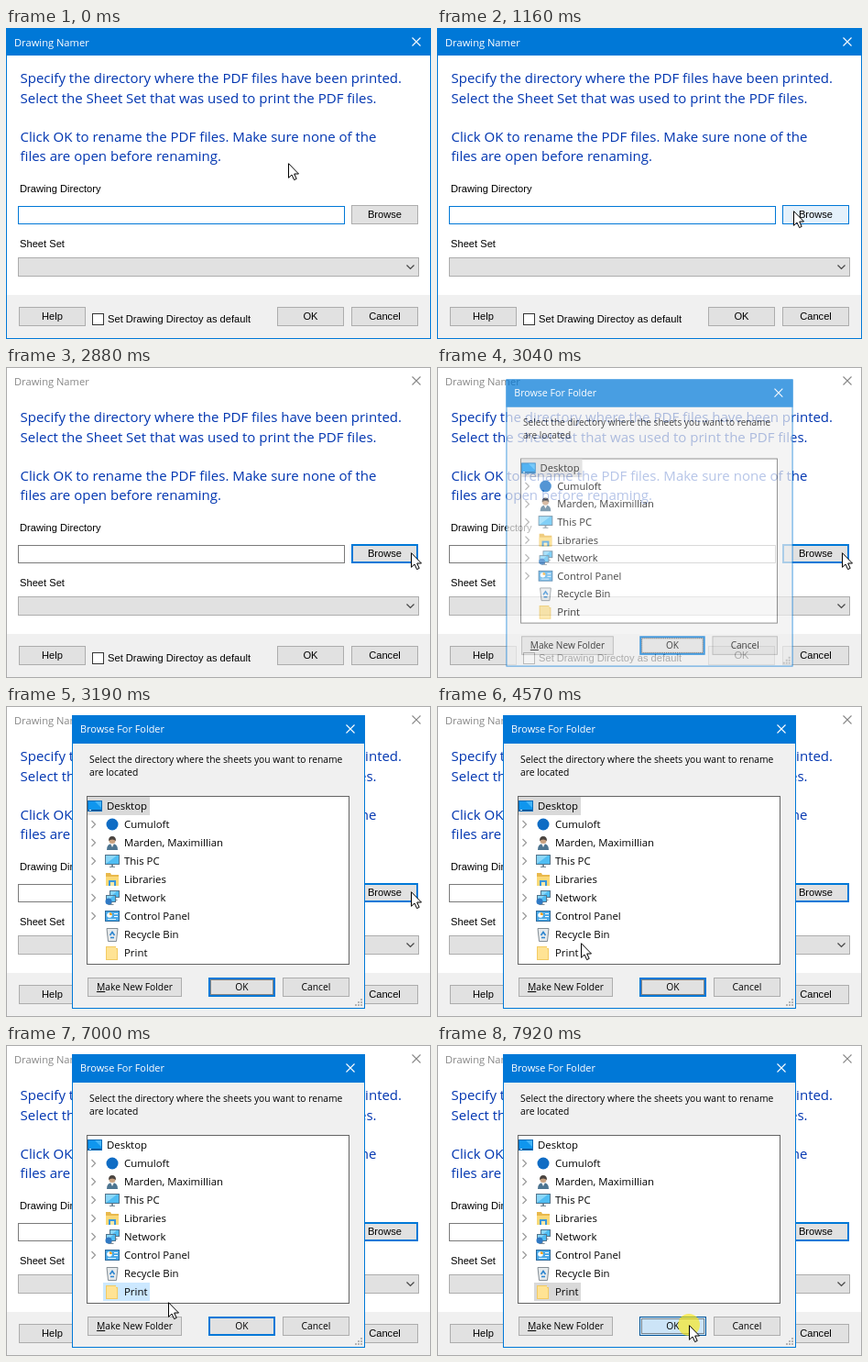
Animation of 464x339 px, one loop 8000 ms. Source, as an HTML page:

```html
<!DOCTYPE html>
<html lang="en">
<head>
<meta charset="utf-8">
<title>Drawing Namer</title>
<style>
  html, body { margin: 0; width: 100%; height: 100%; overflow: hidden; background: #fff; }
  svg { display: block; width: 464px; height: 339px; }
  .ui { font-family: "Open Sans", "Noto Sans", sans-serif; font-size: 11.15px; }
  .form { font-family: "Liberation Sans", Arial, sans-serif; font-size: 11.15px; }
  .small { font-size: 10.3px; }
  .item { font-size: 11.4px; }
  .intro { font-size: 15.02px; fill: #0035b0; }
</style>
</head>
<body>
<svg id="stage" viewBox="0 0 464 339" xmlns="http://www.w3.org/2000/svg"></svg>
<script>
const LOOP = 8000;
const BLUE = '#0078d7';

// Markup helpers
const box = (x, y, w, h, fill, extra = '') =>
  `<rect x="${x}" y="${y}" width="${w}" height="${h}" fill="${fill}" ${extra}/>`;
const framed = (x, y, w, h, fill, stroke, extra = '') =>
  box(x + .5, y + .5, w - 1, h - 1, fill, `stroke="${stroke}" ${extra}`);
const label = (x, y, text, cls = 'ui', extra = '') =>
  `<text x="${x}" y="${y}" class="${cls}" ${extra}>${text}</text>`;
const path = (d, extra) => `<path d="${d}" ${extra}/>`;
const closeX = (x, y, extra) =>
  path(`M${x - 4.5} ${y - 4.5}l9 9m0-9l-9 9`, `fill="none" stroke-width="1.1" ${extra}`);
const button = (id, x, y, w, text, cls) => `<g id="${id}">
  ${framed(x, y, w, 21, '#e1e1e1', '#adadad', `data-x="${x}" data-y="${y}" data-w="${w}"`)}
  ${box(x + 2.5, y + 2.5, w - 5, 16, 'none', 'class="focus" stroke="#222" stroke-dasharray="1 1" visibility="hidden"')}
  ${label(x + w / 2, y + 14, text, cls, 'text-anchor="middle"')}</g>`;

// Icons on a 16 x 16 grid
const monitor = (x, y, w, h) =>
  framed(x, y, w, h, '#4fbdf3', '#52748c') + path(`M${x + 1} ${y + h - 1}V${y + 1}h${w - 4}z`, 'fill="#8ad6f8"') +
  box(x + w / 2 - 1, y + h, 2, 2, '#7b8b98') + box(x + w / 2 - 3, y + h + 2, 6, 1, '#7b8b98');
const icons = {
  desktop: framed(0, 2, 16, 12, '#0f96ee', '#0a6cb8') + path('M8 3h7v7z', 'fill="#43b4f8"') +
    box(1, 12, 14, 1, '#074f8d') + box(2, 12, 2, 1, '#fff'),
  cloud: '<circle cx="8" cy="8" r="6.5" fill="#0f6cc4"/>',
  person: path('M2 16q0-7 6-7t6 7z', 'fill="#4d7591"') + path('M6 9h4l-2 4z', 'fill="#f5f5f5"') +
    '<circle cx="8" cy="5.5" r="3.6" fill="#c9a280"/>' + path('M4 6q0-5 4-5t4 5q-4-3-8 0z', 'fill="#4a4440"'),
  pc: monitor(0, 1, 16, 11),
  libraries: path('M1 1h5l1 2h8v12H1z', 'fill="#e9b94c"') + path('M1 5h14v10H1z', 'fill="#fbd977"') +
    box(4, 9, 8, 6, '#3b98dc') + box(6, 11, 4, 4, '#fbe9a8'),
  network: monitor(5, 0, 11, 8) + monitor(1, 5, 11, 8) + '<circle cx="4" cy="12" r="3.5" fill="#2f79c4"/>',
  panel: framed(0, 2, 16, 12, '#49a9e8', '#2d6b9d') + '<circle cx="5" cy="7" r="2.8" fill="#fff"/>' +
    path('M5 7v-3a3 3 0 0 1 3 3z', 'fill="#f3a72d"') + box(10, 5, 4, 1, '#fff') + box(10, 8, 4, 1, '#fff') +
    box(3, 11, 9, 1, '#d7efff'),
  bin: path('M2 1.5h12l-1.5 14h-9z', 'fill="#e6eaec" stroke="#848d94"') +
    path('M5.5 9l2.5-3.5 2.5 3.5M6 11.5h4', 'fill="none" stroke="#2c84cf" stroke-width="1.6"'),
  folder: path('M1 1h11v2h2v13H1z', 'fill="#f3cb63"') + path('M2 2h10v2h1v11H2z', 'fill="#ffe394"')
};
const tree = [
  ['desktop', 'Desktop'], ['cloud', 'Cumuloft', 1], ['person', 'Marden, Maximillian', 1],
  ['pc', 'This PC', 1], ['libraries', 'Libraries', 1], ['network', 'Network', 1],
  ['panel', 'Control Panel', 1], ['bin', 'Recycle Bin'], ['folder', 'Print']
];
const treeRow = ([icon, name, opens], i) => {
  const y = 109 + 20 * i;
  return `<g transform="translate(${i ? 108 : 89} ${y - 8})">${icons[icon]}</g>` +
    label(i ? 129 : 110, y + 4, name, 'ui item') +
    (opens ? path(`M93.5 ${y - 4}l4 4-4 4`, 'fill="none" stroke="#9a9a9a" stroke-width="1.2"') : '');
};
const grip = [0, 1, 2].map(row => [0, 1, 2].filter(col => col + row >= 2)
  .map(col => box(381 + 3 * col, 319 + 3 * row, 2, 2, '#b5b5b5')).join('')).join('');
const intro = [
  [60, 'Specify the directory where the PDF files have been printed.'],
  [81.5, 'Select the Sheet Set that was used to print the PDF files.'],
  [124, 'Click OK to rename the PDF files. Make sure none of the'],
  [145, 'files are open before renaming.']
];

const mainWindow = `
  ${framed(0, 0, 464, 339, '#fff', BLUE, 'id="frame"')}
  ${box(1, 1, 462, 29, BLUE, 'id="bar"')}
  <g id="heading">${label(9, 20, 'Drawing Namer', 'ui')}</g>
  ${closeX(448, 15, 'id="cross"')}
  ${box(1, 291, 462, 47, '#f0f0f0')}
  ${intro.map(([y, s]) => label(15.5, y, s, 'ui intro')).join('')}
  ${label(15, 179, 'Drawing Directory', 'form')}
  ${framed(13, 194, 357, 20, '#fff', BLUE, 'id="field"')}
  ${box(16, 197, 1, 13, '#000', 'id="caret"')}
  ${button('browse', 377, 193, 73, 'Browse', 'form')}
  ${label(15, 239, 'Sheet Set', 'form')}
  ${framed(13, 250, 438, 21, '#e1e1e1', '#adadad')}
  ${path('M437.5 258.5l4 4 4-4', 'fill="none" stroke="#444" stroke-width="1.2"')}
  ${button('help', 14, 304, 73, 'Help', 'form')}
  ${framed(94, 311, 13, 13, '#fff', '#333')}
  ${label(111, 321, 'Set Drawing Directoy as default', 'form')}
  ${button('accept', 296, 304, 73, 'OK', 'form')}
  ${button('dismiss', 377, 304, 73, 'Cancel', 'form')}`;

const dialog = `<g id="dialog">
  ${framed(72, 10, 320, 320, '#f0f0f0', BLUE)}
  ${box(72, 10, 320, 31, BLUE)}
  ${label(81, 29, 'Browse For Folder', 'ui', 'fill="#fff" style="font-size:10.9px"')}
  ${closeX(376, 25, 'stroke="#fff"')}
  ${label(91, 62, 'Select the directory where the sheets you want to rename', 'ui small')}
  ${label(91, 76, 'are located', 'ui small')}
  ${framed(88, 98, 287, 184, '#fff', '#646464')}
  ${box(89, 99, 68, 20, '#d9d9d9', 'id="desktopRow"')}
  ${box(106, 259, 51, 20, '#e5f3ff', 'id="printRow"')}
  ${tree.map(treeRow).join('')}
  ${button('newFolder', 89, 296, 103, '<tspan text-decoration="underline">M</tspan>ake New Folder', 'ui small')}
  ${button('ok', 221, 296, 73, 'OK', 'ui small')}
  ${button('cancel', 302, 296, 73, 'Cancel', 'ui small')}
  ${grip}</g>`;

const overlay = `
  <g id="tip">${framed(155, 283, 189, 19, '#fff', '#767676')}
    ${label(161, 296, 'Date created: 3/27/2019 10:19 AM', 'ui', 'fill="#575757"')}</g>
  <circle id="click" r="12" fill="#ffe900" opacity=".6"/>
  <g id="arrow">${path('M.5 .7V16.3L4 13l2.6 5.6 2.6-1.2L6.7 12h4.8z', 'fill="#fff" stroke="#000"')}</g>
  <g id="hand">${path('M-1.5 12V2Q-1.5 .5 0 .5T1.5 2V7.5Q3.5 6.5 4.5 8.3 6.5 7.6 7.5 9.3 10.5 8.8 10.5 11.5V15Q10.5 18 8.5 20V22.5H-1V20L-5 14.5Q-6 12.5-4.5 11.8T-1.5 14z', 'fill="#fff" stroke="#000"')}
    ${path('M1.5 7.5V11M4.5 8.5V11.5M7.5 9.5V12', 'stroke="#000" fill="none"')}</g>`;

document.getElementById('stage').innerHTML = mainWindow + dialog + overlay;

const el = id => document.getElementById(id);
const set = (id, attrs) => { for (const k in attrs) el(id).setAttribute(k, attrs[k]); };
const show = (id, on) => set(id, { visibility: on ? 'visible' : 'hidden' });

const looks = {
  normal: ['#e1e1e1', '#adadad', 1],
  primary: ['#e1e1e1', BLUE, 2],
  hover: ['#e5f1fb', BLUE, 1],
  pressed: ['#cce4f7', '#005499', 1]
};
function styleButton(id, look, focused) {
  const [fill, stroke, line] = looks[look];
  const face = el(id).querySelector('rect');
  const { x, y, w } = face.dataset;
  const attrs = { fill, stroke, 'stroke-width': line, x: +x + line / 2, y: +y + line / 2, width: w - line, height: 21 - line };
  for (const k in attrs) face.setAttribute(k, attrs[k]);
  el(id).querySelector('.focus').setAttribute('visibility', focused ? 'visible' : 'hidden');
}

// Pointer moves: start, end, steps, target, easing
const smooth = u => u * u * (3 - 2 * u);
const moves = [
  [80, 860, 11, [371, 198], smooth],
  [1000, 1620, 9, [441, 202], smooth],
  [1850, 1850, 1, [442, 202], smooth],
  [3590, 4350, 11, [217, 238], u => u ** 1.25],
  [4430, 5060, 9, [127, 268], u => 1 - (1 - u) ** 2.7],
  [5210, 5210, 1, [124, 267], smooth],
  [6770, 7460, 10, [275, 305], smooth]
];
function pointerAt(t) {
  let at = [308, 147];
  for (const [start, end, steps, to, ease] of moves) {
    if (t < start) break;
    const gap = (end - start) / (steps - 1) || 1;
    const done = t >= end ? 1 : Math.min(1, (Math.floor((t - start + 20) / gap) + 1) / steps);
    at = at.map((v, i) => Math.round(v + (to[i] - v) * ease(done)));
  }
  return at;
}

function draw(t) {
  const [x, y] = pointerAt(t);
  const within = (a, b) => t >= a && t < b;
  const active = t < 2880;

  // Main window
  set('frame', { stroke: active ? BLUE : '#aaa' });
  set('bar', { fill: active ? BLUE : '#fff' });
  set('heading', { fill: active ? '#fff' : '#888' });
  set('cross', { stroke: active ? '#fff' : '#888' });
  set('field', { stroke: t < 2640 ? BLUE : '#7a7a7a' });
  show('caret', within(280, 810) || within(1340, 1850) || within(2400, 2570));
  const browsePressed = within(2570, 2720);
  styleButton('browse', !active ? 'primary' : browsePressed ? 'pressed' : x >= 377 ? 'hover' : 'normal', browsePressed);

  // Dialog fades and grows in
  const stepTime = 2570 + Math.floor((t - 2570) / 77.5) * 77.5;
  const p = Math.max(0, Math.min(1, (stepTime - 2900) / 290));
  const rest = (1 - p) ** 2;
  const scale = 1 - .075 * rest;
  set('dialog', {
    opacity: 1 - rest,
    transform: `translate(232 170) scale(${scale}) translate(-232 -170)`
  });

  // Tree selection and hover
  const overPrint = x >= 106 && x < 155 && y >= 259 && y < 279;
  const picked = t >= 6070, okPressed = t >= 7920;
  show('desktopRow', !picked);
  show('printRow', picked || overPrint);
  set('printRow', { fill: okPressed ? '#d9d9d9' : picked ? '#cce8ff' : '#e5f3ff' });
  const overOk = x >= 221 && x < 294 && y >= 296;
  styleButton('ok', okPressed ? 'pressed' : overOk ? 'hover' : 'primary', !picked || okPressed);
  show('tip', overPrint && t >= 5000);

  // Pointer
  const place = { transform: `translate(${x} ${y})` };
  ['arrow', 'hand', 'click'].forEach(id => set(id, place));
  show('arrow', !overPrint);
  show('hand', overPrint);
  show('click', browsePressed || within(5910, 6070) || okPressed);
}

const began = performance.now();
function tick() {
  draw((performance.now() - began) % LOOP);
  requestAnimationFrame(tick);
}
draw(0);
requestAnimationFrame(tick);
</script>
</body>
</html>
```
